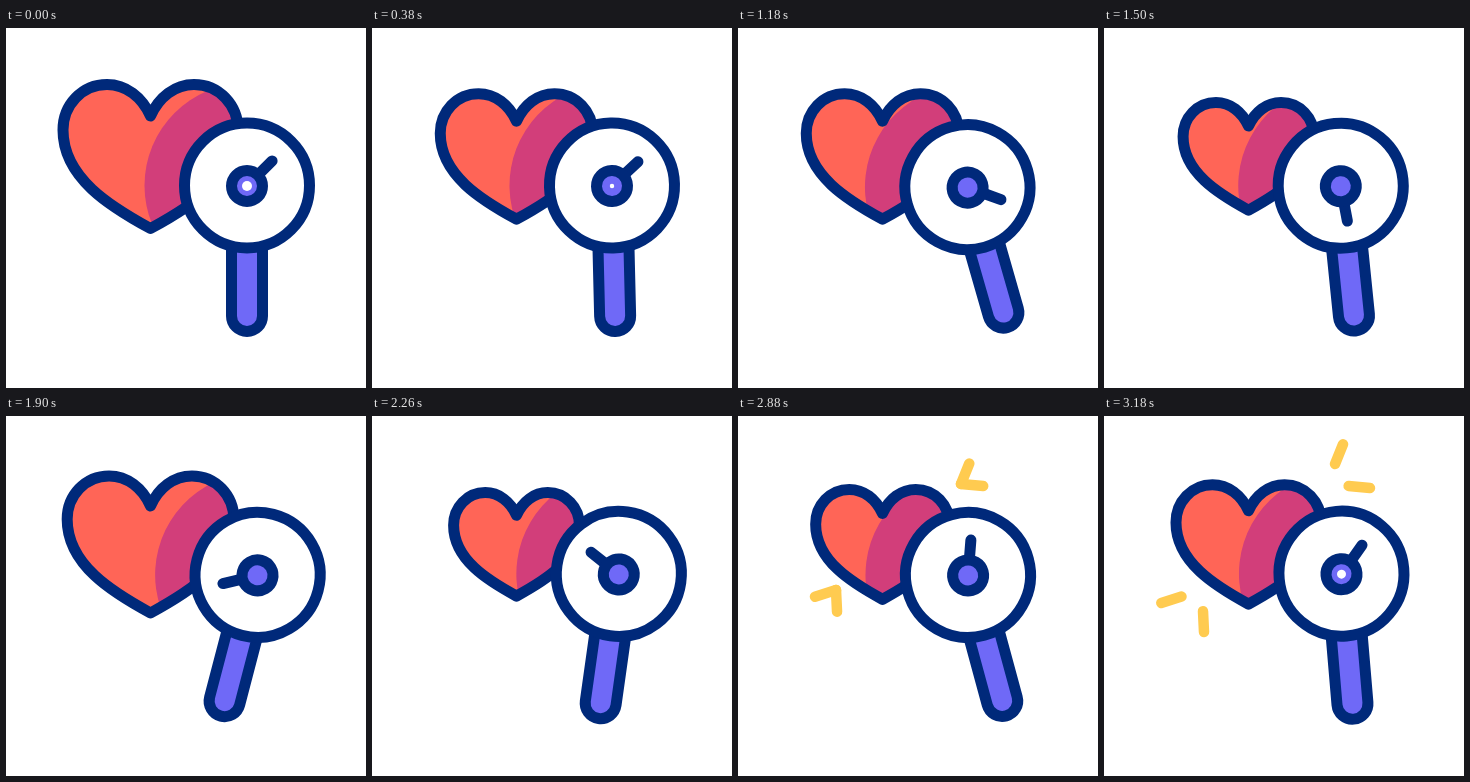
An HTML page for the animation above (3.2 s loop, 360 by 360 pixels).

```html
<!DOCTYPE html>
<html lang="en">
<head>
<meta charset="utf-8">
<title>Heart gauge</title>
<style>
  html, body { margin: 0; width: 100%; height: 100%; overflow: hidden; background: #fff; }
  svg { display: block; width: 100vw; height: 100vh; }
  .line { fill: none; stroke: #00297a; stroke-width: 11; stroke-linecap: round; stroke-linejoin: round; }
  .heart { vector-effect: non-scaling-stroke; }
  .violet { fill: #6f69f7; }
  #sparks { stroke: #ffcb50; stroke-width: 10.5; stroke-linecap: round; }
</style>
</head>
<body>
<svg viewBox="0 0 360 360">
  <defs>
    <path id="shape" d="M144.5 88C136 69 120 56.5 101 56.5C76 56.5 57 77 57 102C57 150 105 179 144.5 200.5C184 179 232 150 232 102C232 77 213 56.5 188 56.5C169 56.5 153 69 144.5 88Z"/>
    <clipPath id="inside"><use class="beat" href="#shape"/></clipPath>
  </defs>
  <g id="sparks"></g>
  <use class="beat" href="#shape" fill="#ff6557"/>
  <g clip-path="url(#inside)">
    <circle class="swing" cx="241" cy="157.5" r="102.5" fill="#d23e7a"/>
  </g>
  <path class="beat line heart" d="M144.5 88C136 69 120 56.5 101 56.5C76 56.5 57 77 57 102C57 150 105 179 144.5 200.5C184 179 232 150 232 102C232 77 213 56.5 188 56.5C169 56.5 153 69 144.5 88Z"/>
  <g class="swing">
    <path class="line violet" d="M225.5 215V288A15.5 15.5 0 0 0 256.5 288V215Z"/>
    <circle class="line" cx="241" cy="157.5" r="62.5" style="fill:#fff"/>
    <path id="needle" class="line" d="M241 142V122.5"/>
    <circle class="line violet" cx="241" cy="158" r="15.5"/>
    <circle id="glint" cx="241" cy="158" r="5" fill="#fff"/>
  </g>
</svg>
<script>
  const LOOP = 3200;
  const $ = id => document.getElementById(id);
  const setAll = (cls, value) =>
    document.querySelectorAll('.' + cls).forEach(el => el.setAttribute('transform', value));

  // Smooth 0..1 ramp between two times
  const ramp = (t, from, to) => {
    const u = Math.min(1, Math.max(0, (t - from) / (to - from)));
    return u * u * (3 - 2 * u);
  };

  // Eased value through [time, value] keys
  const track = (t, keys) => keys.slice(1).reduce((v, [time, value], i) =>
    v + (value - keys[i][1]) * ramp(t, keys[i][0], time), keys[0][1]);

  const swingKeys = [[200, 0], [1200, -16], [2000, 16], [2800, -16], [3400, 0]];
  const beatKeys = Array.from({ length: 9 }, (_, i) => [200 + 400 * i, i % 2 ? 0.7 : 1]);
  const glintKeys = [[220, 5], [520, 0], [2980, 0], [3180, 4.5]];

  // Each spark: origin, then far end
  const sparks = [
    [223, 68, 239, 28.3], [223, 68, 266, 72],
    [98, 174, 57.3, 187], [98, 174, 100, 216]
  ].map(ends => {
    const el = document.createElementNS('http://www.w3.org/2000/svg', 'line');
    $('sparks').append(el);
    return { el, ends };
  });

  function drawSparks(t) {
    const tip = ramp(t, 2600, 3150);
    const tail = ramp(t, 2960, 3400);
    $('sparks').style.display = tip > 0 ? '' : 'none';
    for (const { el, ends: [x, y, ex, ey] } of sparks) {
      [tail, tip].forEach((p, i) => {
        el.setAttribute('x' + (i + 1), x + (ex - x) * p);
        el.setAttribute('y' + (i + 1), y + (ey - y) * p);
      });
    }
  }

  function draw(now) {
    const t = now % LOOP;
    const scale = track(t, beatKeys);
    setAll('beat', `translate(144.5 128) scale(${scale}) translate(-144.5 -128)`);
    setAll('swing', `rotate(${track(t, swingKeys)} 241 199.5)`);
    $('needle').setAttribute('transform', `rotate(${45 + 360 * ramp(t, 200, 3400)} 241 158)`);
    $('glint').setAttribute('r', track(t, glintKeys));
    drawSparks(t);
    requestAnimationFrame(draw);
  }
  draw(0);
</script>
</body>
</html>
```
